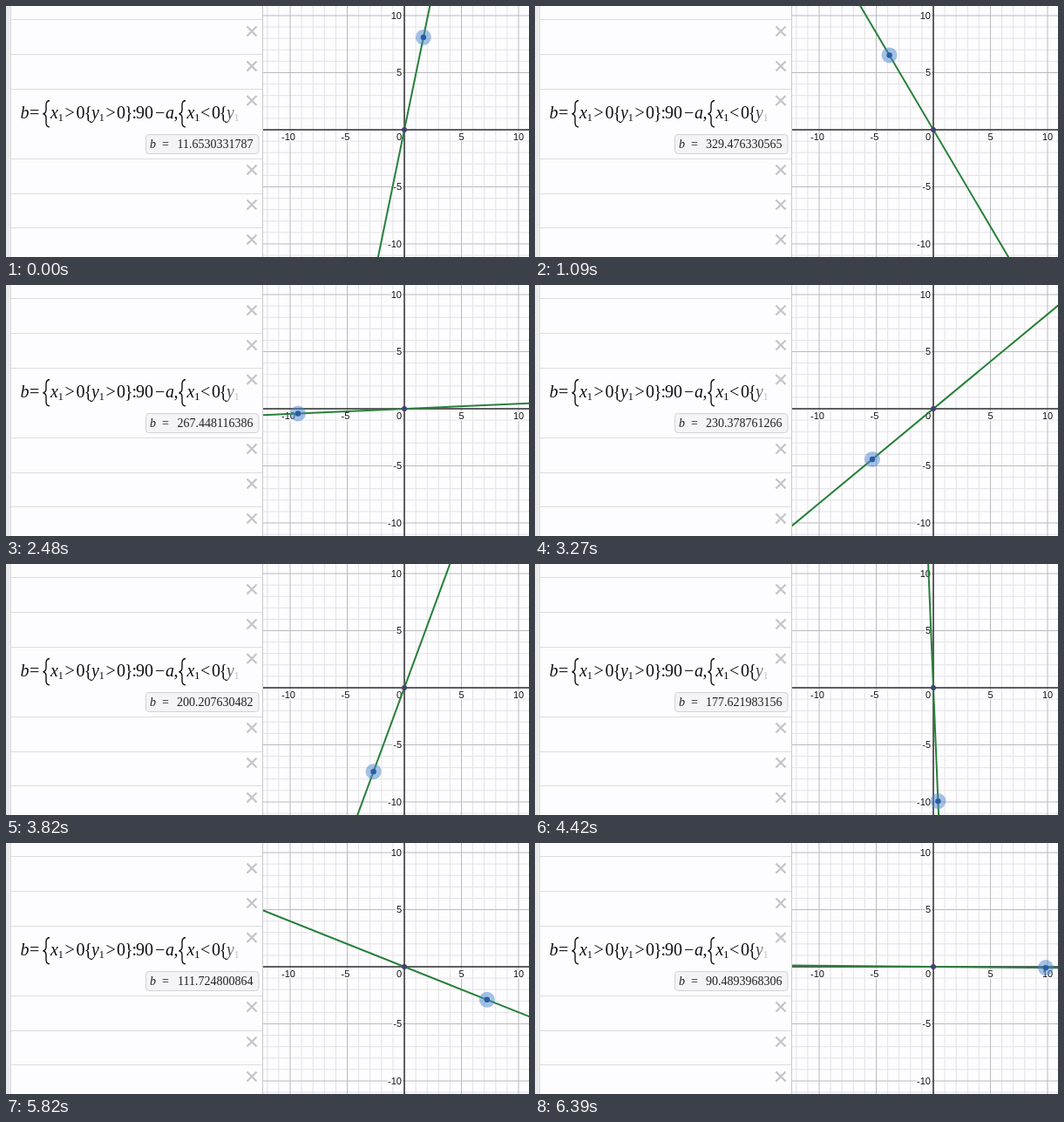
An HTML page that plays this animation: 600 by 288 pixels, repeating every 6420 ms.

```html
<!DOCTYPE html>
<html lang="en">
<head>
<meta charset="utf-8">
<title>Angle of a dragged point</title>
<style>
  html, body { margin: 0; width: 100%; height: 100%; overflow: hidden; background: #fdfcfe; }
  svg { display: block; width: 600px; height: 288px; }
  .math { font: 20px "Liberation Serif", "Times New Roman", serif; fill: #111; }
  .math .sub { font-size: 13px; }
  .it { font-style: italic; }
  .value { font: 14px "Liberation Serif", "Times New Roman", serif; fill: #222; }
  .label { font: 11px "Liberation Sans", Arial, sans-serif; fill: #111;
           stroke: #fdfcfe; stroke-width: 3px; stroke-linejoin: round; paint-order: stroke; }
  .minor { stroke: #e3e2e5; }
  .major { stroke: #bab9bd; }
  .axis { stroke: #2b2b2e; stroke-width: 1.5; }
  .rule { stroke: #dddce0; }
  .cross { stroke: #c6c5c9; stroke-width: 2.4; fill: none; }
  .brace { fill: none; stroke: #111; stroke-width: 1.4; }
</style>
</head>
<body>
<svg viewBox="0 0 600 288">
  <defs>
    <clipPath id="plot"><rect x="295" width="305" height="288"/></clipPath>
    <linearGradient id="fade">
      <stop offset="0" stop-color="#fdfcfe" stop-opacity="0"/>
      <stop offset="1" stop-color="#fdfcfe"/>
    </linearGradient>
  </defs>
  <rect width="600" height="288" fill="#fdfcfe"/>

  <g clip-path="url(#plot)">
    <g id="grid"></g>
    <g id="labels"></g>
    <line id="ray" stroke="#27803a" stroke-width="2"/>
    <circle cx="457" cy="142" r="3" fill="#463f74"/>
    <g id="point">
      <circle r="9" fill="#4a86cc" fill-opacity=".5"/>
      <circle r="3.2" fill="#2a5ca6"/>
    </g>
  </g>

  <g id="rows"></g>
  <rect width="5" height="288" fill="#eae9ec"/>
  <path d="M5.5 0V288" stroke="#dddce0"/>
  <path d="M294.5 0V288" stroke="#c9c8cc"/>

  <g class="math" id="formula"></g>
  <rect x="252" y="104" width="17" height="36" fill="url(#fade)"/>

  <rect id="box" y="147.5" height="22" rx="3.5" fill="#f4f3f6" stroke="#d3d2d6"/>
  <g class="value">
    <text id="name" class="it" y="163">b</text>
    <text id="equals" y="163">=</text>
    <text id="number" x="283.5" y="163" text-anchor="end"></text>
  </g>
</svg>
<script>
const $ = id => document.getElementById(id);
const OX = 457, OY = 142, UNIT = 13.1, LOOP = 6420, RATE = 0.033;

function add(parent, tag, attrs, text) {
  const el = document.createElementNS("http://www.w3.org/2000/svg", tag);
  set(el, attrs);
  if (text !== undefined) el.textContent = text;
  $(parent).append(el);
}
function set(el, attrs) {
  for (const key in attrs) el.setAttribute(key, attrs[key]);
}

// Grid: minor lines first, then major ones, then the axes
function gridLines(cls, test) {
  for (let i = -13; i <= 11; i++) {
    if (!test(i)) continue;
    const x = OX + i * UNIT, y = OY - i * UNIT;
    add("grid", "path", { class: cls, d: `M${x} 0V288M295 ${y}H600` });
  }
}
gridLines("minor", i => i % 5);
gridLines("major", i => i && i % 5 === 0);
gridLines("axis", i => i === 0);

for (const n of [-10, -5, 5, 10]) {
  const shift = n < 0 ? -2 : 0;
  add("labels", "text", { class: "label", x: OX + n * UNIT + shift, y: 154, "text-anchor": "middle" }, n);
  add("labels", "text", { class: "label", x: 454, y: OY - n * UNIT + 3.5, "text-anchor": "end" }, n);
}
add("labels", "text", { class: "label", x: 454, y: 154, "text-anchor": "end" }, 0);

// Expression list
for (const y of [15.5, 55.5, 95.5, 175.5, 215.5, 254.5])
  add("rows", "path", { class: "rule", d: `M5 ${y}H294` });
for (const y of [29, 69, 108.5, 188, 228, 268])
  add("rows", "path", { class: "cross", d: `M276.5 ${y - 5.5}l11 11m0 -11l-11 11` });

const put = (x, text, cls = "") =>
  add("formula", "text", { x, y: cls === "sub" ? 132 : 129, class: cls }, text);
function variable(x, name) {
  put(x, name, "it");
  put(x + 8.5, "1", "sub");
}
const bigBrace = x => add("formula", "path", {
  class: "brace",
  d: `M${x + 7} 108.5q-4 .5 -4 5v5.500q0 4 -3.500 4.700q3.500 .7 3.500 4.700v5.500q0 4.500 4 5`
});
put(16.5, "b", "it");
put(27, "=");
bigBrace(43);
variable(51, "x");
put(67.5, ">");
put(80.5, "0");
put(89.5, "{");
variable(98, "y");
put(114.5, ">");
put(127, "0");
put(136, "}");
put(144.5, ":");
put(149, "90");
put(171, "−");
put(183, "a", "it");
put(192.5, ",");
bigBrace(199);
variable(207.5, "x");
put(223, "<");
put(236, "0");
put(244.5, "{");
variable(253, "y");

// Drag path: [tick, bearing, |dx| + |dy|], a diamond travelled at nearly even speed
const path = [
  [0, 11.6530331787, 128], [36, 329.476330565, 136], [82, 267.448116386, 127.5],
  [108, 230.378761266, 128], [146, 177.621983156, 135.5],
  [175, 138.693345383, 135], [211, 90.4893968306, 130]
].map(([tick, bearing, size], i) => ({ tick, size, pos: toSide(i ? 360 - bearing : -bearing) }));

// Angle (counter-clockwise from up) to distance in diamond sides, and back
function toSide(angle) {
  const side = Math.floor(angle / 90), a = (angle - side * 90) * Math.PI / 180;
  return side + Math.sin(a) / (Math.sin(a) + Math.cos(a));
}
function toAngle(pos) {
  const side = Math.floor(pos), f = pos - side;
  return side * 90 + Math.atan2(f, 1 - f) * 180 / Math.PI;
}

function draw(tick) {
  let i = 0;
  while (i < path.length - 2 && tick >= path[i + 1].tick) i++;
  const from = path[i], to = path[i + 1];
  const u = (tick - from.tick) / (to.tick - from.tick);
  const mix = key => from[key] * (1 - u) + to[key] * u;

  const angle = toAngle(mix("pos")), a = angle * Math.PI / 180;
  const sin = Math.sin(a), cos = Math.cos(a);
  const r = mix("size") / (Math.abs(sin) + Math.abs(cos));
  set($("point"), { transform: `translate(${OX - r * sin} ${OY - r * cos})` });
  set($("ray"), {
    x1: OX - 400 * sin, y1: OY - 400 * cos,
    x2: OX + 400 * sin, y2: OY + 400 * cos
  });

  const text = ((360 - angle) % 360).toPrecision(12);
  const left = 283.5 - (7 * text.length - 3.5);
  $("number").textContent = text;
  set($("name"), { x: left - 31 });
  set($("equals"), { x: left - 17 });
  set($("box"), { x: left - 35.5, width: 325.5 - left });
}

const start = performance.now();
function frame() {
  const t = (performance.now() - start) % LOOP;
  draw(Math.min(211, Math.floor((t + 5) * RATE)));
  requestAnimationFrame(frame);
}
frame();
</script>
</body>
</html>
```
